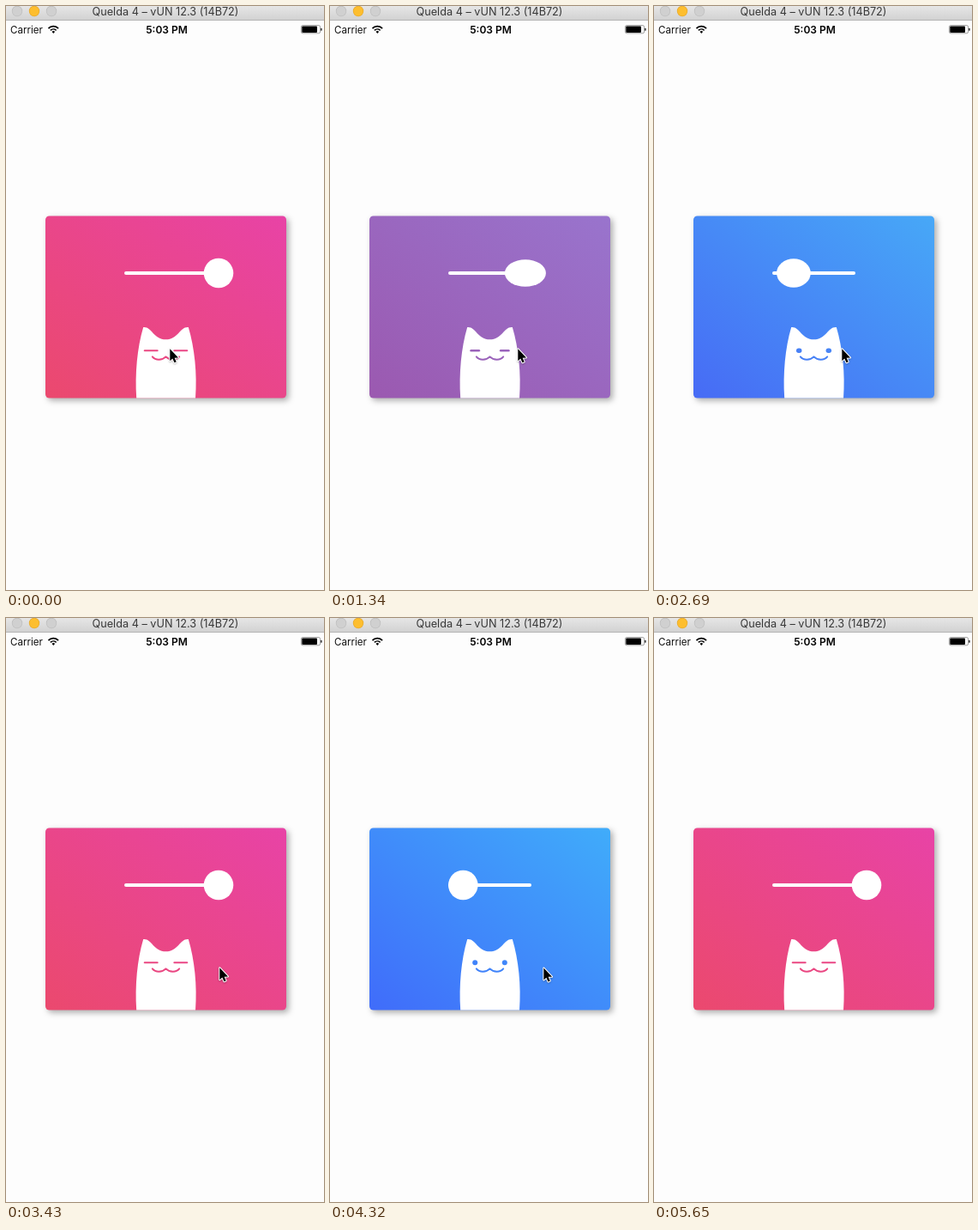
Animation, 371 px wide and 680 px high, one loop 6240 ms. Source, as an HTML page with a canvas:

```html
<!DOCTYPE html>
<html lang="en">
<head>
<meta charset="utf-8">
<title>Cat switch</title>
<style>
  html, body { margin: 0; width: 371px; height: 680px; overflow: hidden; background: #fdfdfd; }
  canvas { display: block; }
</style>
</head>
<body>
<canvas id="stage" width="371" height="680"></canvas>
<script>
const ctx = document.getElementById('stage').getContext('2d');
const LOOP = 6240;
const STEP = LOOP / 42;           // the picture advances in even, held steps
const TAPS = [1265, 2632, 3951, 5015];
const SLIDE = 240;
const CARD = { x: 46, y: 244.5, w: 281, h: 212 };
const KNOB = { off: 248, on: 155.3, r: 17.3 };
const OFF = { low: [235, 73, 110], high: [232, 67, 166] };
const ON = { low: [64, 108, 250], high: [64, 172, 250] };

const clamp = v => Math.min(1, Math.max(0, v));
const lerp = (a, b, p) => a + (b - a) * p;
const smooth = p => p * p * (3 - 2 * p);
const easeIn = p => p ** 6;
const easeOut = p => 1 - (1 - p) ** 3;
const easeInOut = p => p < .5 ? 16 * p ** 5 : 1 - 16 * (1 - p) ** 5;

// Pointer moves, from and to in steps.
const HOME = { x: 191.3, y: 399.3 };
const MOVES = [
  { from: 2, to: 4, x: 219.3, y: 399.3, ease: easeOut },
  { from: 20, to: 23, x: 249.3, y: 407.3, ease: easeInOut },
  { from: 28, to: 31, x: 290.3, y: 532, ease: easeIn },
  { from: 31, to: 33, x: 262.3, y: 421.3, ease: easeOut },
  { from: 36, to: 38, x: 311, y: 712, ease: easeOut }
];

function pointerAt(step) {
  return MOVES.reduce((pos, { from, to, x, y, ease }) => {
    const p = ease(clamp((step - from) / (to - from)));
    return { x: lerp(pos.x, x, p), y: lerp(pos.y, y, p) };
  }, HOME);
}

// The knob stretches as it slides; the colour follows once it has left its end.
function switchAt(t) {
  const last = TAPS.findLastIndex(tap => tap <= t);
  const toOn = last % 2 === 0;
  const slide = last < 0 ? 1 : smooth(clamp((t - TAPS[last]) / SLIDE));
  const fade = clamp(3.2 * (slide - .07));
  const stretch = Math.min(slide, 1 - slide);
  const on = p => toOn ? p : 1 - p;
  return {
    tint: on(fade),
    x: lerp(KNOB.off, KNOB.on, on(slide)),
    rx: KNOB.r + 31 * stretch,
    ry: KNOB.r - 7.2 * stretch
  };
}

function mix(a, b, p) {
  return `rgb(${a.map((v, i) => Math.round(lerp(v, b[i], p)))})`;
}

function fillBox(x, y, w, h, r, color) {
  ctx.beginPath();
  ctx.roundRect(x, y, w, h, r);
  ctx.fillStyle = color;
  ctx.fill();
}

function ellipse(x, y, rx, ry, color) {
  ctx.beginPath();
  ctx.ellipse(x, y, rx, ry, 0, 0, Math.PI * 2);
  ctx.fillStyle = color;
  ctx.fill();
}

function label(text, x, y, font, color, align) {
  ctx.font = `${font} Inter, sans-serif`;
  ctx.fillStyle = color;
  ctx.textAlign = align;
  ctx.fillText(text, x, y);
}

function drawTitleBar() {
  const shade = ctx.createLinearGradient(0, 0, 0, 16);
  shade.addColorStop(0, '#e6e6e6');
  shade.addColorStop(1, '#d2d2d2');
  ctx.fillStyle = shade;
  ctx.fillRect(0, 0, 371, 16);
  ctx.fillStyle = '#b4b4b4';
  ctx.fillRect(0, 16, 371, 1);
  for (let i = 0; i < 3; i++) {
    const x = 13 + 20 * i, lit = i === 1;
    ellipse(x, 6, 6.2, 6.2, lit ? '#e6a92f' : '#bdbdbd');
    ellipse(x, 6, 5.5, 5.5, lit ? '#fdbe2f' : '#d0d0d0');
  }
  label('Quelda 4 – vUN 12.3 (14B72)', 186, 11, '12.7px', '#383838', 'center');
}

function drawStatusBar() {
  label('Carrier', 5, 31.5, '11.6px', '#111', 'left');
  label('5:03 PM', 187.5, 31.5, '600 12px', '#000', 'center');

  const fan = r => ctx.arc(55.3, 31.6, r, -Math.PI * .76, -Math.PI * .24);
  ctx.strokeStyle = '#000';
  ctx.lineCap = 'butt';
  ctx.lineWidth = 1.7;
  for (const r of [4.6, 8]) {
    ctx.beginPath();
    fan(r);
    ctx.stroke();
  }
  ctx.beginPath();
  ctx.moveTo(55.3, 32);
  fan(2.4);
  ctx.fillStyle = '#000';
  ctx.fill();

  ctx.strokeStyle = '#777';
  ctx.lineWidth = .7;
  ctx.beginPath();
  ctx.roundRect(344.4, 22.6, 22.2, 9.2, 1.8);
  ctx.stroke();
  fillBox(345.3, 23.5, 17.7, 7.4, 1, '#000');
  fillBox(367.3, 25.8, 1.2, 3, .6, '#000');
}

function cardGradient(tint) {
  // Contours run parallel to the card's falling diagonal.
  const { x, y, w, h } = CARD;
  const k = 2 / (1 / (w * w) + 1 / (h * h));
  const g = ctx.createLinearGradient(x, y + h, x + k / w, y + h - k / h);
  g.addColorStop(0, mix(OFF.low, ON.low, tint));
  g.addColorStop(1, mix(OFF.high, ON.high, tint));
  return g;
}

function drawCard(paint) {
  const { x, y, w, h } = CARD;
  ctx.save();
  ctx.shadowColor = 'rgba(0,0,0,.32)';
  ctx.shadowBlur = 7;
  ctx.shadowOffsetX = ctx.shadowOffsetY = 3;
  fillBox(x, y, w, h, 4.5, paint);
  ctx.restore();
}

function drawCat(paint, tint) {
  const mid = 186.5, floor = CARD.y + CARD.h;
  ctx.beginPath();
  ctx.moveTo(152.2, floor);
  ctx.bezierCurveTo(150.4, 428, 153, 398, 160.2, 374);
  ctx.bezierCurveTo(170, 373, 172, 388.3, mid, 388.3);
  ctx.bezierCurveTo(201, 388.3, 203, 373, 212.8, 374);
  ctx.bezierCurveTo(220, 398, 223.2, 428, 221, floor);
  ctx.fillStyle = '#fff';
  ctx.fill();

  const w = lerp(17, 6, tint), h = lerp(2.1, 6, tint ** 3);
  for (const side of [-1, 1]) {
    fillBox(mid + 17.3 * side - w / 2, 401.2 - h / 2, w, h, Math.min(w, h) / 2, paint);
  }

  ctx.beginPath();
  ctx.moveTo(mid - 15.7, 408.4);
  ctx.bezierCurveTo(mid - 12, 412.9, mid - 4.5, 412.9, mid, 408.4);
  ctx.bezierCurveTo(mid + 4.5, 412.9, mid + 12, 412.9, mid + 15.7, 408.4);
  ctx.strokeStyle = paint;
  ctx.lineWidth = 2;
  ctx.lineCap = ctx.lineJoin = 'round';
  ctx.stroke();
}

function drawPointer({ x, y }) {
  ctx.save();
  ctx.translate(x, y);
  ctx.beginPath();
  [[0, 0], [0, 14], [3, 11.2], [5.2, 16], [7.4, 15], [5.3, 10.4], [9.7, 10.2]]
    .forEach(point => ctx.lineTo(...point));
  ctx.closePath();
  ctx.lineJoin = 'round';
  ctx.lineWidth = 2;
  ctx.strokeStyle = '#fff';
  ctx.shadowColor = 'rgba(0,0,0,.25)';
  ctx.shadowBlur = 2;
  ctx.shadowOffsetY = 1;
  ctx.stroke();
  ctx.shadowColor = 'transparent';
  ctx.fillStyle = '#000';
  ctx.fill();
  ctx.restore();
}

function draw(time) {
  const step = Math.floor(time / STEP);
  const { tint, x, rx, ry } = switchAt(step * STEP);
  const paint = cardGradient(tint);
  ctx.fillStyle = '#fdfdfd';
  ctx.fillRect(0, 0, 371, 680);
  drawTitleBar();
  drawStatusBar();
  drawCard(paint);
  fillBox(138, 309, 97, 4, 2, '#fff');
  ellipse(x, 311, rx, ry, '#fff');
  drawCat(paint, tint);
  drawPointer(pointerAt(step));
}

const start = performance.now();
function frame() {
  draw((performance.now() - start) % LOOP);
  requestAnimationFrame(frame);
}
frame();
</script>
</body>
</html>
```
